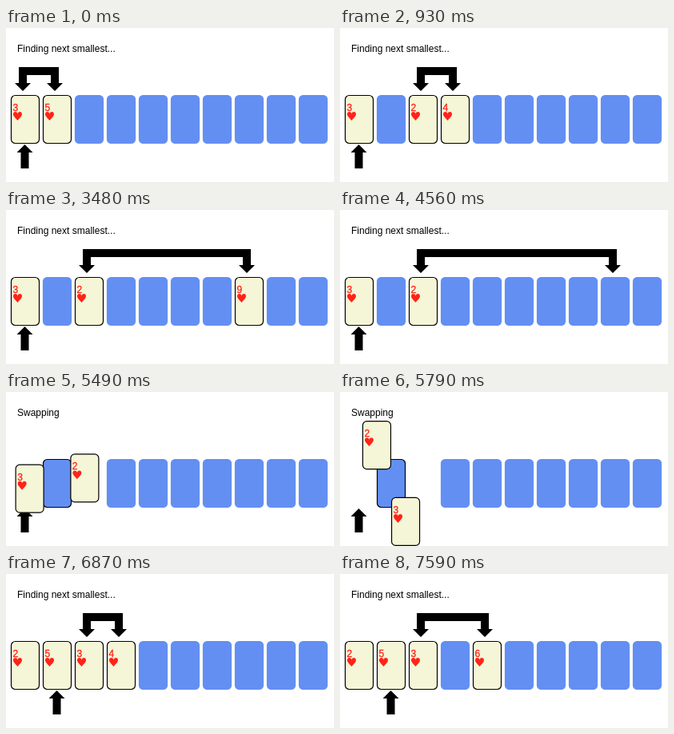
An HTML page with a canvas that plays this animation: 410 by 193 pixels, repeating every 8 s.

```html
<!DOCTYPE html>
<html lang="en">
<head>
<meta charset="utf-8">
<title>Selection sort</title>
<style>
html, body { margin: 0; width: 100%; height: 100%; overflow: hidden; background: #fff; }
canvas { display: block; width: 410px; height: 193px; }
</style>
</head>
<body>
<canvas id="stage"></canvas>
<script>
const W = 410, H = 193, LOOP = 8000, TICK = 30;
const FONT = '12px "Liberation Sans", Arial, Helvetica, sans-serif';
const INK = '#000', FACE = '#f5f5d7', BACK = '#638ff3', RED = '#ff2318';
const STEP = 40, CARD_X = 6.5, CARD_Y = 84.5, CARD_W = 35, CARD_H = 60;

const values = ['3', '5', '2', '4', '6', '8', '7', '9', '10', 'J'];
const swapped = ['2', '5', '3', ...values.slice(3)];

// Each comparison: start, end of reveal, smallest so far, card compared
const compares = [
  [0, 25, 0, 1], [385, 750, 0, 2], [750, 1090, 2, 3], [1415, 1755, 2, 4],
  [2090, 2430, 2, 5], [2770, 3110, 2, 6], [3450, 3800, 2, 7], [4125, 4520, 2, 8],
  [4795, 5390, 2, 9],
  [6215, 6870, 1, 2], [6870, 7200, 2, 3], [7530, LOOP, 2, 4]
];
const SWAP_START = 5390, SWAP_END = 6215;

const canvas = document.getElementById('stage');
const ctx = canvas.getContext('2d');
const ratio = window.devicePixelRatio || 1;
canvas.width = W * ratio;
canvas.height = H * ratio;
ctx.scale(ratio, ratio);

function polygon(points) {
  ctx.beginPath();
  points.forEach(([x, y]) => ctx.lineTo(x, y));
  ctx.closePath();
  ctx.fillStyle = INK;
  ctx.fill();
}

function heart(x, y) {
  ctx.beginPath();
  ctx.moveTo(x, y + 11);
  ctx.bezierCurveTo(x - 2, y + 8, x - 5.5, y + 6, x - 5.5, y + 3);
  ctx.bezierCurveTo(x - 5.5, y - 0.8, x - 1, y - 0.8, x, y + 2.4);
  ctx.bezierCurveTo(x + 1, y - 0.8, x + 5.5, y - 0.8, x + 5.5, y + 3);
  ctx.bezierCurveTo(x + 5.5, y + 6, x + 2, y + 8, x, y + 11);
  ctx.fill();
}

function card(slot, label, dx = 0, dy = 0, outlined = true) {
  const x = CARD_X + slot * STEP + dx, y = CARD_Y + dy;
  ctx.beginPath();
  ctx.roundRect(x, y, CARD_W, CARD_H, 5);
  ctx.fillStyle = label ? FACE : BACK;
  ctx.fill();
  ctx.lineWidth = 1.2;
  ctx.strokeStyle = outlined ? INK : BACK;
  ctx.stroke();
  if (!label) return;
  ctx.fillStyle = RED;
  ctx.strokeStyle = RED;
  ctx.lineWidth = 0.3;
  ctx.fillText(label, x + 2, y + 19.5);
  ctx.strokeText(label, x + 2, y + 19.5);
  heart(x + 8, y + 20.5);
}

function compareArrow(from, to) {
  const a = 21 + from * STEP, b = 21 + to * STEP;
  polygon([
    [a - 5, 49], [b + 5, 49], [b + 5, 69], [b + 10, 69], [b, 79], [b - 10, 69],
    [b - 5, 69], [b - 5, 59], [a + 5, 59], [a + 5, 69], [a + 10, 69], [a, 79],
    [a - 10, 69], [a - 5, 69]
  ]);
}

function pointer(slot) {
  const x = 23.5 + slot * STEP;
  polygon([
    [x, 146], [x + 10, 156], [x + 5, 156], [x + 5, 176],
    [x - 5, 176], [x - 5, 156], [x - 10, 156]
  ]);
}

// Quadratic curve that leaves diagonally and arrives vertically
function swapOffset(t) {
  const p = (t - SWAP_START) / (SWAP_END - SWAP_START);
  const s = 0.5 - Math.cos(Math.PI * p) / 2;
  return [80 * s * (2 - s), 192 * s * (1 - s)];
}

function drawSwap(t) {
  const [dx, dy] = swapOffset(t);
  pointer(0);
  for (let i = 3; i < 10; i++) card(i, null, 0, 0, false);
  card(1, null);
  card(0, '3', dx, dy);
  card(2, '2', -dx, -dy);
}

function drawSearch(t) {
  const second = t >= SWAP_END;
  const [start, end, least, other] = compares.filter(c => c[0] <= t).pop();
  const open = new Set(second ? [0, 1, least] : [0, least]);
  if (t >= start && t < end) open.add(other);
  const labels = second ? swapped : values;
  labels.forEach((v, i) => card(i, open.has(i) ? v : null, 0, 0, open.has(i)));
  compareArrow(least, other);
  pointer(second ? 1 : 0);
}

function draw(t) {
  const swapping = t >= SWAP_START && t < SWAP_END;
  ctx.fillStyle = '#fff';
  ctx.fillRect(0, 0, W, H);
  ctx.font = FONT;
  ctx.fillStyle = INK;
  ctx.fillText(swapping ? 'Swapping' : 'Finding next smallest...', 14, 30);
  (swapping ? drawSwap : drawSearch)(t);
}

const origin = performance.now();
function frame() {
  const t = (performance.now() - origin) % LOOP;
  draw(Math.floor(t / TICK) * TICK);
  requestAnimationFrame(frame);
}
frame();
</script>
</body>
</html>
```
